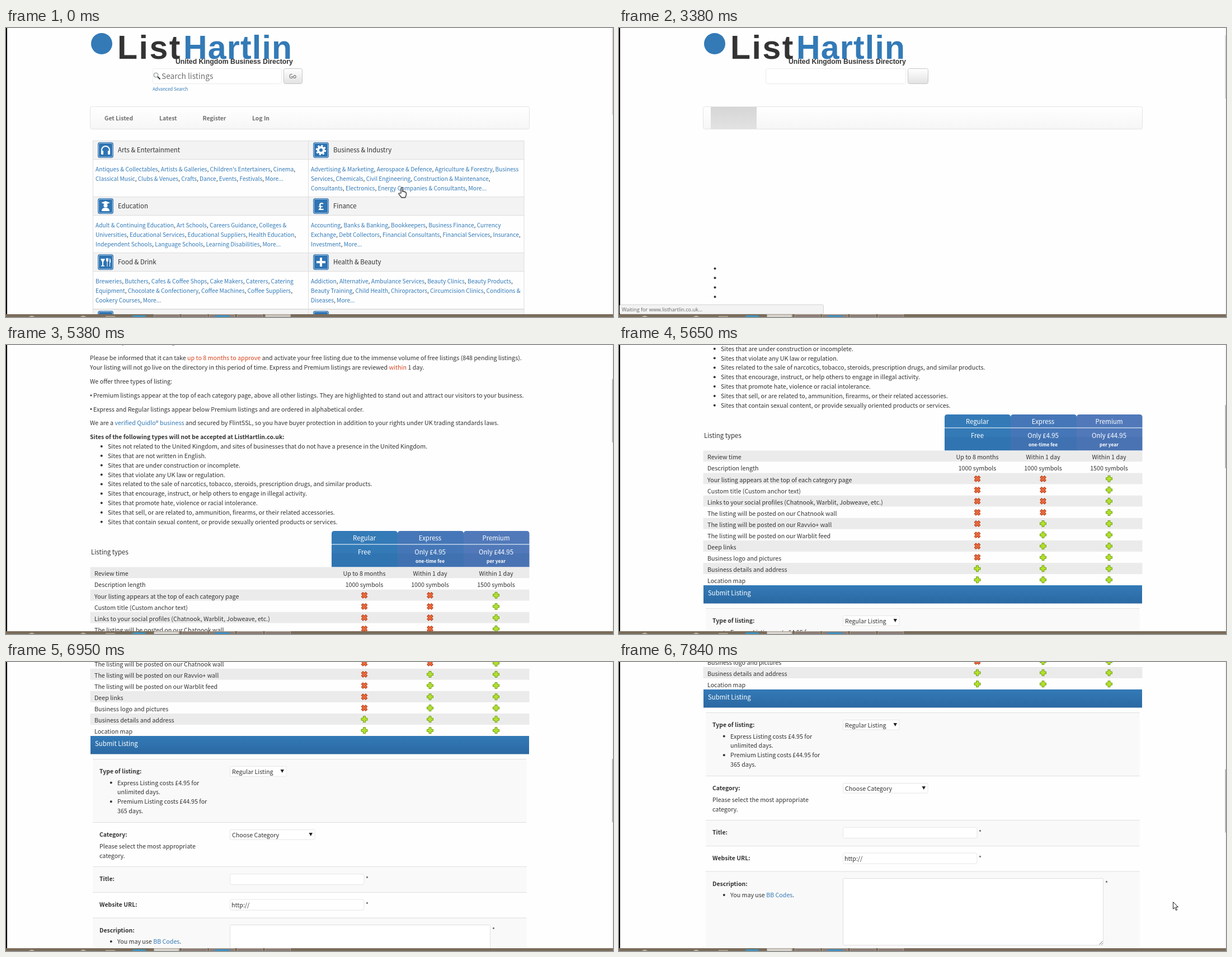
An HTML page that plays this animation: 1085x516 px, repeating every 8000 ms.

```html
<!DOCTYPE html>
<html lang="en">
<head>
<meta charset="utf-8">
<title>Business directory</title>
<style>
html, body { margin: 0; width: 100%; height: 100%; overflow: hidden; background: #fefefe; }
svg { display: block; width: 1085px; height: 516px; }
text {
  font: 10.68px "Noto Sans CJK JP", "Noto Sans CJK SC", "Noto Sans CJK", "Open Sans", sans-serif;
  fill: #333; white-space: pre;
}
.b { font-weight: 700; font-size: 10.45px; }
.dir { font-size: 10.2px; fill: #337ab7; }
.h { font-size: 11.42px; }
.w { fill: #fff; }
.fee { font-size: 8.4px; font-weight: 700; fill: #fff; }
.nav { font-size: 10.4px; font-weight: 700; fill: #707070; }
.ph { font-size: 13.75px; fill: #707070; }
.small { font-size: 7.95px; fill: #337ab7; }
.go { font-size: 10.2px; fill: #555; }
.logo { font: 700 59px "Liberation Sans", Arial, sans-serif; }
.tag { font: 700 12.27px "Liberation Sans", Arial, sans-serif; }
.status text { font: 9.1px "Open Sans", sans-serif; fill: #666; }
.mid { text-anchor: middle; }
.blue { fill: #337ab7; }
.red { fill: #d9431e; }
.dark { fill: #333; }
.grey { fill: #666; }

/* every track is stepped and 8 s long */
.anim { animation: 8s step-end infinite; }
.root { animation-name: scroll; --s: 0; }
.page { transform: translateY(calc(var(--s) * -1px)); }
.thumb { transform: translateY(calc(var(--s) * 1px / 4.5)); }
.old { animation-name: old; }
.wait { animation-name: wait; }
.new { animation-name: new; }
.ready { animation-name: ready; }
.hover { animation-name: hover; }
.status { animation-name: status; }
.s1 { animation-name: s1; }
.s2 { animation-name: s2; }
.s3 { animation-name: s3; }
.s4 { animation-name: s4; }
.before { animation-name: before; }
.after { animation-name: after; }
.hand { animation-name: hand; }
.arrow { animation-name: arrow; }

@keyframes scroll {
  0% { --s: 0 } 61.25% { --s: 25 } 63.75% { --s: 110 } 67.25% { --s: 215 }
  68.625% { --s: 320 } 70.625% { --s: 423 } 72.625% { --s: 490 } 73.125% { --s: 555 }
  77.75% { --s: 622 } 80.125% { --s: 640 } 84.125% { --s: 664 } 86.375% { --s: 692 }
  86.875% { --s: 720 } 88.625% { --s: 726 } 89.25% { --s: 733 } 91% { --s: 740 }
  91.5% { --s: 748 } 95.5% { --s: 766 } 96.75% { --s: 785 } 98%, 100% { --s: 803 }
}
@keyframes old { 0% { opacity: 1 } 42.25%, 100% { opacity: 0 } }
@keyframes wait { 0% { opacity: 0 } 42.25% { opacity: 1 } 49.5%, 100% { opacity: 0 } }
@keyframes new { 0% { opacity: 0 } 49.5%, 100% { opacity: 1 } }
@keyframes ready { 0% { opacity: 1 } 42.25% { opacity: 0 } 49.5%, 100% { opacity: 1 } }
@keyframes hover { 0% { opacity: 0 } 4.875%, 100% { opacity: 1 } }
@keyframes status { 0% { opacity: 0 } 4.875% { opacity: 1 } 49.5%, 100% { opacity: 0 } }
@keyframes s1 { 0% { opacity: 1 } 16.875%, 100% { opacity: 0 } }
@keyframes s2 { 0% { opacity: 0 } 16.875% { opacity: 1 } 22.25%, 100% { opacity: 0 } }
@keyframes s3 { 0% { opacity: 0 } 22.25% { opacity: 1 } 44.5% { opacity: 0 } 47.625%, 100% { opacity: 1 } }
@keyframes s4 { 0% { opacity: 0 } 44.5% { opacity: 1 } 47.625%, 100% { opacity: 0 } }
@keyframes before { 0% { opacity: 1 } 12%, 100% { opacity: 0 } }
@keyframes after { 0% { opacity: 0 } 12%, 100% { opacity: 1 } }
@keyframes hand {
  0% { opacity: 1; transform: translate(701px, 284px) }
  .875% { opacity: 0; transform: translate(203px, 150px) }
  4.875% { opacity: 1; transform: translate(203px, 154px) }
  5.5% { opacity: 1; transform: translate(203px, 160px) }
  6.25% { opacity: 1; transform: translate(202px, 167px) }
  8.25% { opacity: 1; transform: translate(201px, 166px) }
  8.75% { opacity: 1; transform: translate(201px, 165px) }
  12%, 100% { opacity: 0; transform: translate(201px, 165px) }
}
@keyframes arrow {
  0% { opacity: 0; transform: translate(560px, 235px) }
  .875% { opacity: 1; transform: translate(560px, 235px) }
  1.75% { opacity: 1; transform: translate(340px, 180px) }
  2.75% { opacity: 1; transform: translate(204px, 143px) }
  4.875% { opacity: 0; transform: translate(204px, 143px) }
  12% { opacity: 1; transform: translate(205px, 165px) }
  14.75% { opacity: 1; transform: translate(915px, 432px) }
  16.875% { opacity: 1; transform: translate(935px, 440px) }
  17.75% { opacity: 1; transform: translate(958px, 444px) }
  18.75% { opacity: 1; transform: translate(970px, 440px) }
  42.25% { opacity: 0; transform: translate(990px, 428px) }
  96.75%, 100% { opacity: 1; transform: translate(990px, 428px) }
}
</style>
</head>
<body>
<script>
const esc = s => s.replace(/&(?!\w+;)/g, '&amp;');
// whole-pixel baselines keep the letters sharp
const text = (x, y, s, cls = '') =>
  `<text x="${x}" y="${Math.round(y)}" class="${cls}">${esc(s)}</text>`;
const rect = (x, y, w, h, fill, more = '') =>
  `<rect x="${x}" y="${y}" width="${w}" height="${h}" fill="${fill}" ${more}/>`;
const box = (x, y, w, h, stroke = '#e6e6e6', fill = '#fff', r = 3) =>
  rect(x + .5, y + .5, w - 1, h - 1, fill, `stroke="${stroke}" rx="${r}"`);
const dot = (x, y, r = 2) => `<circle cx="${x}" cy="${y}" r="${r}" fill="#333"/>`;
const group = (cls, s) => `<g class="anim ${cls}">${s}</g>`;
const span = (cls, s) => `<tspan class="${cls}">${s}</tspan>`;
const move = (x, y, s) => `<g transform="translate(${x} ${y})">${s}</g>`;
const bullet = (x, y, s) => dot(x - 11.2, y - 4) + text(x, y, s);

// logo, search and menu
const search = (w, bw) =>
  box(262, 72, w, 28, '#ebebeb') + box(262 + w + 3, 72, bw, 28, '#c6c6c6', 'url(#btn)');

const header =
  '<circle cx="171" cy="28" r="19" class="blue"/>' +
  '<text x="199" y="55" class="logo" letter-spacing="2.500">List</text>' +
  '<text x="317" y="55" class="logo blue" letter-spacing="1.200">Hartlin</text>' +
  text(303, 64, 'United Kingdom Business Directory', 'tag') +
  box(150, 140, 786, 41, '#e4e4e4', 'url(#panel)');

const highlight = w => rect(164, 141, w, 39.5, 'url(#press)');

const menu =
  search(231, 34) +
  '<circle cx="268" cy="84" r="4" fill="#eef3f6" stroke="#888"/>' +
  '<path d="M271 87l4.500 4.500" stroke="#333" stroke-width="2"/>' +
  text(278, 91, 'Search listings', 'ph') + text(506, 90, 'Go', 'go') +
  text(262, 112, 'Advanced Search', 'small') +
  group('hover', highlight(75.5)) +
  text(176, 165, 'Get Listed', 'nav') + text(274, 165, 'Latest', 'nav') +
  text(351.5, 165, 'Register', 'nav') + text(440, 165, 'Log In', 'nav');

// category table
const icons = {
  phones: '<path d="M7 18v-4a7 7 0 0 1 14 0v4" fill="none" stroke="#fff" stroke-width="2"/>' +
    rect(6, 15, 4, 7, '#fff', 'rx="1"') + rect(18, 15, 4, 7, '#fff', 'rx="1"'),
  gear: '<g fill="none" stroke="#fff"><circle cx="14" cy="14" r="5" stroke-width="4"/>' +
    '<circle cx="14" cy="14" r="7.500" stroke-width="3.500" stroke-dasharray="2.945"/></g>',
  grad: '<path d="M14 5l8 3-8 3-8-3zM7 23c0-5 3-6 7-6s7 1 7 6z" fill="#fff"/>' +
    '<circle cx="14" cy="13" r="3.600" fill="#fff"/>',
  pound: '<text x="14" y="21" class="mid w" style="font-size:18px;font-weight:700">£</text>',
  food: '<path d="M5 8h8l-3 6v6h2v1.500H6V20h2v-6z" fill="#fff"/>' +
    '<path d="M15 7v4q0 2 1.500 2v9h1v-9Q19 13 19 11V7zM21 7q2.500 1 2 8h-1v7h-1z" fill="#fff"/>',
  plus: rect(12, 6, 4, 16, '#fff') + rect(6, 12, 16, 4, '#fff'),
  none: ''
};
const cats = [
  ['phones', 'Arts & Entertainment',
    'Antiques & Collectables, Artists & Galleries, Children\'s Entertainers, Cinema,',
    'Classical Music, Clubs & Venues, Crafts, Dance, Events, Festivals, More...'],
  ['gear', 'Business & Industry',
    'Advertising & Marketing, Aerospace & Defence, Agriculture & Forestry, Business',
    'Services, Chemicals, Civil Engineering, Construction & Maintenance,',
    'Consultants, Electronics, Energy Companies & Consultants, More...'],
  ['grad', 'Education',
    'Adult & Continuing Education, Art Schools, Careers Guidance, Colleges &',
    'Universities, Educational Services, Educational Suppliers, Health Education,',
    'Independent Schools, Language Schools, Learning Disabilities, More...'],
  ['pound', 'Finance',
    'Accounting, Banks & Banking, Bookkeepers, Business Finance, Currency',
    'Exchange, Debt Collectors, Financial Consultants, Financial Services, Insurance,',
    'Investment, More...'],
  ['food', 'Food & Drink',
    'Breweries, Butchers, Cafes & Coffee Shops, Cake Makers, Caterers, Catering',
    'Equipment, Chocolate & Confectionery, Coffee Machines, Coffee Suppliers,',
    'Cookery Courses, More...'],
  ['plus', 'Health & Beauty',
    'Addiction, Alternative, Ambulance Services, Beauty Clinics, Beauty Products,',
    'Beauty Training, Child Health, Chiropractors, Circumcision Clinics, Conditions &',
    'Diseases, More...'],
  ['none', ''], ['none', '']
];
const category = ([icon, name, ...lines], i) => {
  const x = 155 + i % 2 * 385, y = 201.5 + Math.round((i >> 1) * 100.2);
  return rect(x + .5, y, 385.5, 33, '#f3f3f3', 'stroke="#ddd"') +
    rect(x + .5, y + 33, 385.5, 67.25, '#fefefe', 'stroke="#ddd"') +
    move(x + 9, y + 2.5, rect(0, 0, 28, 28, '#2f74b3', 'rx="4"') +
      rect(1.5, 1.5, 25, 25, 'none', 'rx="3" stroke="#b9d3e8"') + icons[icon]) +
    text(x + 45, y + 20.5, name, 'h') +
    lines.map((l, k) => text(x + 5, y + 54.5 + k * 16.8,
      l.replace(/,/g, span('dark', ',')), 'dir')).join('');
};

// listing page: introduction
const rules = [
  'Sites not related to the United Kingdom, and sites of businesses that do not have a presence in the United Kingdom.',
  'Sites that are not written in English.',
  'Sites that are under construction or incomplete.',
  'Sites that violate any UK law or regulation.',
  'Sites related to the sale of narcotics, tobacco, steroids, prescription drugs, and similar products.',
  'Sites that encourage, instruct, or help others to engage in illegal activity.',
  'Sites that promote hate, violence or racial intolerance.',
  'Sites that sell, or are related to, ammunition, firearms, or their related accessories.',
  'Sites that contain sexual content, or provide sexually oriented products or services.'
];
const intro =
  text(150, 213, span('blue', 'UK Directory')) + text(220, 213, span('grey', '/')) +
  text(230.5, 213, span('grey', 'Submit Listing')) +
  text(150, 242, `Please be informed that it can take ${span('red', 'up to 8 months to approve')} and activate your free listing due to the immense volume of free listings (848 pending listings).`) +
  text(150, 259, `Your listing will not go live on the directory in this period of time. Express and Premium listings are reviewed ${span('red', 'within')} 1 day.`) +
  text(150, 284, 'We offer three types of listing:') +
  dot(152, 305, 1.4) +
  text(156, 309, 'Premium listings appear at the top of each category page, above all other listings. They are highlighted to stand out and attract our visitors to your business.') +
  dot(152, 329.5, 1.4) +
  text(156, 333.5, 'Express and Regular listings appear below Premium listings and are ordered in alphabetical order.') +
  text(150, 358, `We are a ${span('blue', 'verified Quidlo® business')} and secured by FlintSSL, so you have buyer protection in addition to your rights under UK trading standards laws.`) +
  text(150, 383, 'Sites of the following types will not be accepted at ListHartlin.co.uk:', 'b') +
  rules.map((r, i) => bullet(182, 400 + i * 16.85, r)).join('');

// listing page: price table
const plans = [
  [582, 118, '#337ab7', 'Regular', 'Free', ''],
  [700, 118, '#4577b8', 'Express', 'Only £4.95', 'one-time fee'],
  [818, 117.5, '#5179ba', 'Premium', 'Only £44.95', 'per year']
];
const mid = [640.5, 758, 876];
const features = [
  'Review time|Up to 8 months|Within 1 day|Within 1 day',
  'Description length|1000 symbols|1000 symbols|1500 symbols',
  'Your listing appears at the top of each category page|x|x|+',
  'Custom title (Custom anchor text)|x|x|+',
  'Links to your social profiles (Chatnook, Warblit, Jobweave, etc.)|x|x|+',
  'The listing will be posted on our Chatnook wall|x|x|+',
  'The listing will be posted on our Ravvio+ wall|x|+|+',
  'The listing will be posted on our Warblit feed|x|+|+',
  'Deep links|x|+|+',
  'Business logo and pictures|x|+|+',
  'Business details and address|+|+|+',
  'Location map|+|+|+'
];
const mark = (c, x, y) => move(x, y, `<use href="#sign" ${c === 'x'
  ? 'transform="rotate(45)" fill="#ea6a3c" stroke="#b8401c"'
  : 'fill="#b4e32c" stroke="#6f9d12"'}/>`);

const prices =
  plans.map(([x, w, c, name, cost, fee], i) =>
    `<path d="M${x} 64.500V5q0-5 5-5h${w - 10}q5 0 5 5v59.500z" fill="${c}"/>` +
    rect(x, 40, w, 24.5, '#1d4f80', 'opacity=".12"') +
    rect(x, 23.3, w, 1.2, '#e4edf5') +
    text(mid[i], 17, name, 'h w mid') + text(mid[i], 42, cost, 'h w mid') +
    text(mid[i], 57, fee, 'fee mid')).join('') +
  text(152, 42, 'Listing types', 'h') +
  features.map((f, i) => {
    const [name, ...cells] = f.split('|'), y = 64.5 + i * 20.05;
    return rect(150.5, y, 785, 20.05, i % 2 ? '#fefefe' : '#ebebeb') +
      text(158, y + 15.9, name) +
      cells.map((c, k) => c.length > 1
        ? text(mid[k], y + 15.9, c, 'mid') : mark(c, mid[k], y + 10.2)).join('');
  }).join('');

// listing page: form, measured from the top of the blue bar
const band = (y, h, fill) =>
  rect(155, y, 775.5, h, fill) + rect(155, y, 775.5, 1, '#e0e0e0');
const select = (y, w, s) => box(400, y, w, 18.5, '#e6e6e6', '#fff', 1) + text(404, y + 13.5, s) +
  `<path d="M${400 + w - 11} ${y + 6}h6.500l-3.250 6z" fill="#222"/>`;
const input = (y, s) => box(400, y, 240.5, 20) + text(403, y + 14, s) + text(643, y + 13, '*');

const form =
  rect(151, 0, 784, 32.5, 'url(#bar)') + text(159, 18, 'Submit Listing', 'h w') +
  band(41, 113, '#f9f9f9') + band(154, 79, '#fefefe') + band(233, 46, '#f9f9f9') +
  band(279, 45.5, '#fefefe') + band(324.5, 170, '#f9f9f9') +
  text(167, 67, 'Type of listing:', 'b') + select(54, 101.5, 'Regular Listing') +
  bullet(199, 87.5, 'Express Listing costs £4.95 for') + text(199, 104.3, 'unlimited days.') +
  bullet(199, 121.3, 'Premium Listing costs £44.95 for') + text(199, 138, '365 days.') +
  text(167, 180, 'Category:', 'b') + select(167, 152.5, 'Choose Category') +
  text(167, 200.5, 'Please select the most appropriate') + text(167, 217.5, 'category.') +
  text(167, 259, 'Title:', 'b') + input(246, '') +
  text(167, 305, 'Website URL:', 'b') + input(291.5, 'http://') +
  text(167, 350.5, 'Description:', 'b') +
  bullet(199, 371, `You may use ${span('blue', 'BB Codes')}.`) +
  box(400, 337, 466, 120, '#e0e0e0', '#fff', 1) + text(869, 350, '*') +
  '<path d="M858.500 455.500l6-6M862 455.500l2.500-2.500" stroke="#666" fill="none"/>';

const page = header + group('ready', menu) +
  group('old', cats.map(category).join('')) +
  group('wait', search(251, 37) + highlight(82) +
    [0, 1, 2, 3].map(i => dot(171.5, 429.5 + i * 16.85)).join('')) +
  group('new', intro + move(0, 547, prices) + move(0, 852, form));

// browser edges, status bubble, taskbar, pointers
const host = 'listhartlin.co.uk';
const status = box(1, 493.5, 365, 18, '#d2d2d2', '#f3f3f3', 2) +
  [`www.${host}/submit.php`, `Waiting for ${host}...`, `Waiting for www.${host}...`,
    `Waiting for static.${host}...`]
    .map((s, i) => group('s' + (i + 1), text(5, 506, s))).join('');

const button = (x, fill) => rect(x + .5, 511.5, 45, 6, fill, 'stroke="#a99f93"');
const arc = x => `<circle cx="${x}" cy="520" r="6.500" fill="#b8ad9f"/>`;
const taskbar = rect(0, 511, 1085, 5, '#7a6c5b') + arc(46) + arc(138) +
  rect(178, 514, 17, 2, '#a89b86') + rect(226, 513, 24, 3, '#3f93bd', 'rx="2"') +
  [264, 314, 363, 413, 463].map(x => button(x, '#8c7d76')).join('') +
  rect(373, 513, 27, 3, '#3f8fc0') +
  group('before', button(463, '#c9c3bc')) +
  group('after', button(264, '#d6d2cc') + rect(308, 511, 2, 5, '#b9b1a6'));

const edges = rect(0, 0, 2, 516, '#000') + rect(1083, 0, 2, 511, '#f4f4f4') +
  group('old', rect(1083.5, 0, 1.5, 155, '#dccfd2')) +
  group('wait', rect(1083.5, 13, 1.5, 113, '#d3cbd0')) +
  group('new', '<g class="thumb">' + rect(1083.5, 13, 1.5, 113, '#a9a6b4') + '</g>');

const pointers =
  group('hand', '<path transform="scale(1.1)" d="M4.500 10V2q0-1.500 1.300-1.500T7 2v5q2-.8 2.300.6 1.700-.6 2.200.8 1.500-.4 1.500 1.300v3L11.500 17h-6L1 11.500q-.5-2 1.200-1.700z" fill="#fff" stroke="#000"/>') +
  group('arrow', '<path d="M.5.500v12.500l2.900-2.700 2.200 5 2-.9-2.200-4.900h4z" fill="#fff" stroke="#000" stroke-width=".9"/>');

const gradient = (id, a, b) => `<linearGradient id="${id}" x2="0" y2="1">` +
  `<stop stop-color="${a}"/><stop offset="1" stop-color="${b}"/></linearGradient>`;

document.body.innerHTML =
  '<svg viewBox="0 0 1085 516"><defs>' +
  gradient('btn', '#fff', '#e2e2e2') + gradient('panel', '#fff', '#f6f6f6') +
  gradient('press', '#d6d6d6', '#e2e2e2') + gradient('bar', '#337ab7', '#2b69a2') +
  '<path id="sign" d="M-2-5.500h4V-2h3.500v4H2v3.500h-4V2h-3.500v-4H-2z" stroke-linejoin="round"/></defs>' +
  group('root', `<g class="page">${page}</g>` + edges + group('status', status) + taskbar + pointers) +
  '</svg>';
</script>
</body>
</html>
```
